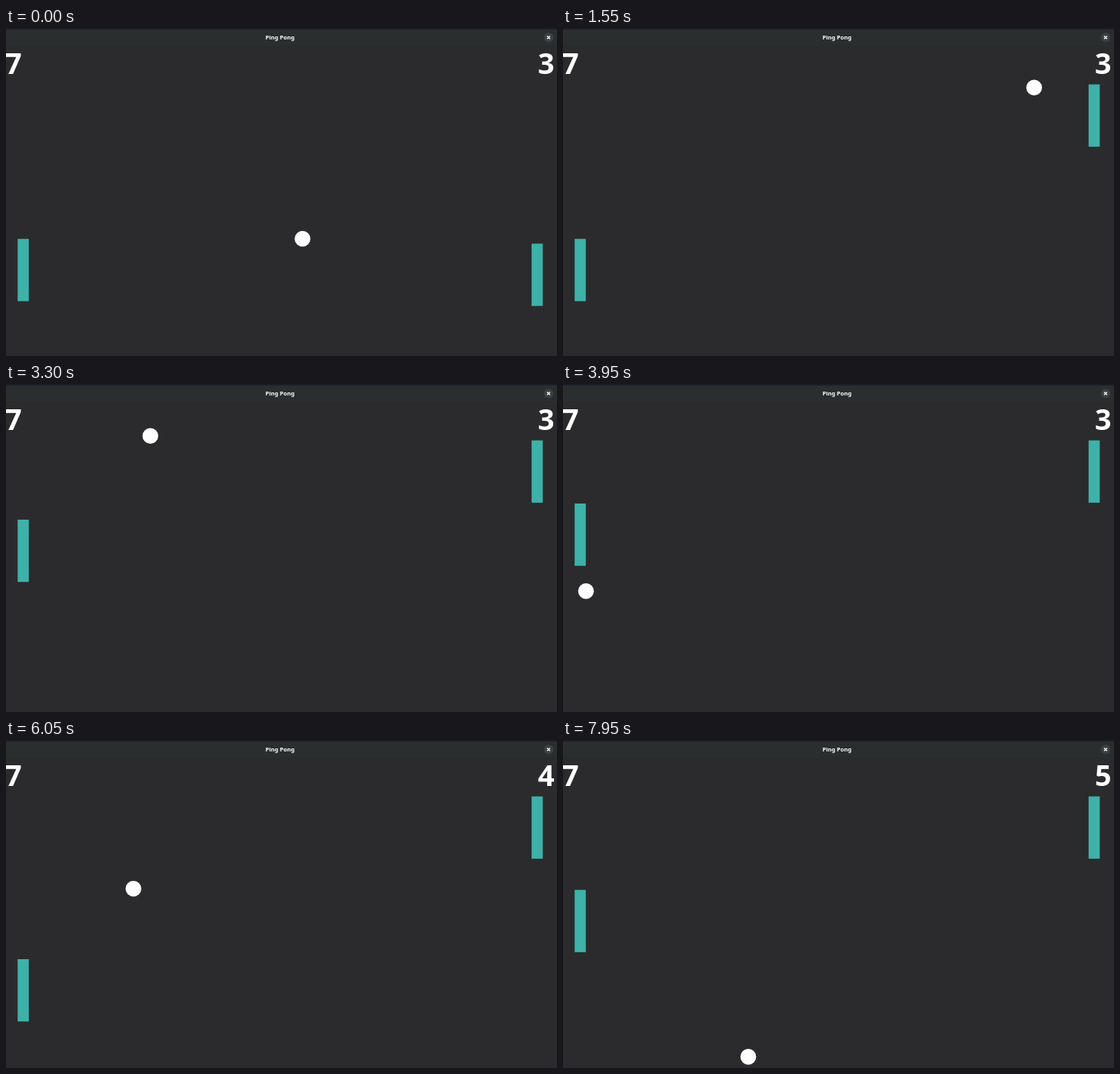
Write an HTML page that moves like this. It is 720 by 428 pixels and loops after 8 s.

```html
<!DOCTYPE html>
<html lang="en">
<head>
<meta charset="utf-8">
<title>Ping Pong</title>
<style>
  html, body { margin: 0; width: 100%; height: 100%; overflow: hidden; background: #2b2b2d; }
  svg { display: block; width: 100vw; height: 100vh; }
  text { fill: #fff; font-family: "Noto Sans", "Open Sans", sans-serif; font-weight: 700; }
  .score { font-size: 37.8px; }
  .paddle { fill: #3eb1a9; }
</style>
</head>
<body>
<svg viewBox="0 0 720 428">
  <rect width="720" height="428" fill="#2b2b2d"/>
  <rect id="left" class="paddle" x="15.2" width="14.6" height="81.3"/>
  <rect id="right" class="paddle" x="686.8" width="14.6" height="81.3"/>
  <circle id="ball" r="10.3" fill="#fff"/>
  <rect width="720" height="23" fill="#2a2e2f"/>
  <rect width="720" height="2" fill="#1c1d2a"/>
  <text x="358" y="15.2" font-size="7.6" text-anchor="middle">Ping Pong</text>
  <circle cx="709" cy="12.4" r="6.2" fill="#3d4042"/>
  <path d="M707.1 10.5l3.8 3.8m0-3.8l-3.8 3.8" stroke="#fff" stroke-width="1.3"/>
  <text class="score" x="-1" y="60">7</text>
  <text id="score" class="score" x="695" y="60">3</text>
</svg>
<script>
const LOOP = 8000, STEP = 50;
const TOP = 36, BOTTOM = 431;      // limits for the ball's centre
const PADDLE_SPEED = 21.6 / STEP;

// Each leg: start time, position, velocity per step.
const legs = [
  { t: 0,    x: 387.5, y: 275,   vx: 11.26, vy: 18.85 },
  { t: 1292, x: 678.6, y: 99.9,  vx: -12.2, vy: -20.47 },
  { t: 4075, x: 359.6, y: 225.6, vx: 0,     vy: 0 },
  { t: 5025, x: 358.2, y: 227.3, vx: -9.35, vy: 21.5 },
  { t: 6990, x: 359.6, y: 225.6, vx: 0,     vy: 0 },
  { t: 7505, x: 359.6, y: 225.6, vx: -13.2, vy: 21.1 }
];

// Paddle moves: [start time, top edge to reach].
const leftMoves = [[1900, 177], [3600, 143], [3920, 286], [6050, 46], [6843, 195.6]];
const rightMoves = [[550, 171.7], [950, 73.6]];

const el = id => document.getElementById(id);
const left = el("left"), right = el("right"), ball = el("ball"), score = el("score");

// Reflect a straight path between the top and bottom walls.
function bounce(y) {
  const span = BOTTOM - TOP;
  const p = (((y - TOP) % (2 * span)) + 2 * span) % (2 * span);
  return TOP + (p < span ? p : 2 * span - p);
}

function paddleTop(y, moves, t) {
  for (const [start, goal] of moves) {
    if (t < start) break;
    const reach = Math.min(Math.abs(goal - y), (t - start) * PADDLE_SPEED);
    y += Math.sign(goal - y) * reach;
  }
  return y;
}

function draw(t) {
  const leg = legs.filter(l => l.t <= t).pop();
  const n = (t - leg.t) / STEP;
  ball.setAttribute("cx", leg.x + leg.vx * n);
  ball.setAttribute("cy", bounce(leg.y + leg.vy * n));
  left.setAttribute("y", paddleTop(275.2, leftMoves, t));
  right.setAttribute("y", paddleTop(281.4, rightMoves, t));
  score.textContent = t < 4075 ? 3 : t < 6990 ? 4 : 5;
}

const begin = performance.now();
function tick() {
  const t = (performance.now() - begin) % LOOP;
  draw(Math.floor(t / STEP) * STEP);
  requestAnimationFrame(tick);
}
tick();
</script>
</body>
</html>
```
